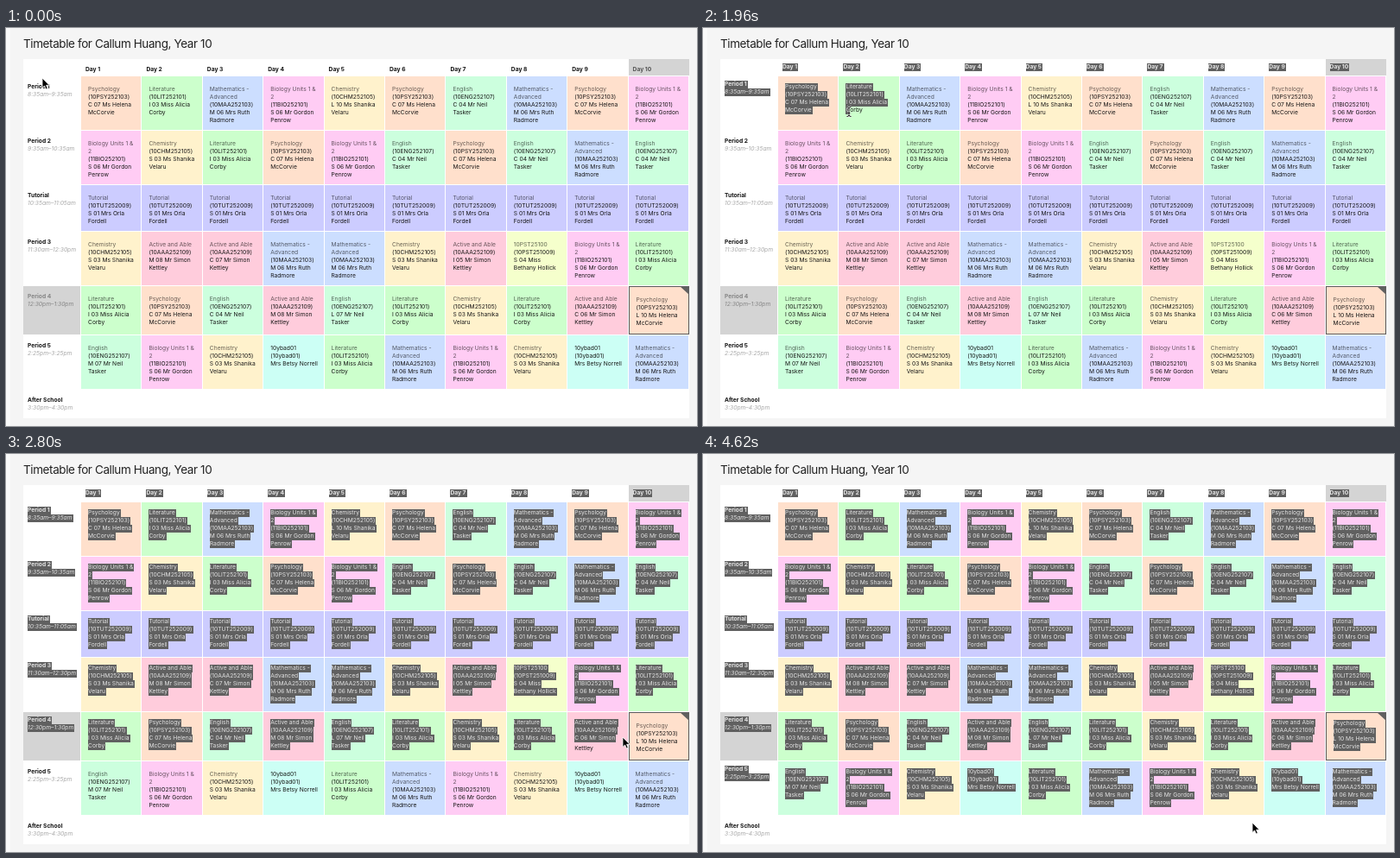
These frames come from a looping animation (800x461 px, 4.69 s). An HTML page:

```html
<!DOCTYPE html>
<html lang="en">
<head>
<meta charset="utf-8">
<title>Timetable</title>
<style>
html, body { margin: 0; width: 100%; height: 100%; overflow: hidden; }
#stage {
  position: relative; width: 800px; height: 461px; overflow: hidden;
  background: #f5f5f5; border-left: 5px solid #fafafa; box-sizing: border-box;
  font: 6.7px/9.1px Inter, "Open Sans", sans-serif; color: #161616; cursor: default;
}
#stage > * { position: absolute; }
#layer { left: -5px; top: 0; width: 800px; height: 461px; }
#layer > * { position: absolute; }
h1 { margin: 0; left: 20px; top: 9px; font-size: 13.5px; line-height: 18px; font-weight: 400; letter-spacing: -.4px; white-space: pre; color: #222; }
.line { height: 9.1px; white-space: pre; }
.line mark { display: inline-block; height: 9.1px; background: #606060; color: #e4e4e4; }
.line mark.full { padding-right: 1px; }
.dim { color: #0009; }
.head { font-weight: 700; color: #111; }
.time { font-style: italic; color: #a8a8a8; }
.off { color: #858585; }
.today { color: #555; }
#edge { box-sizing: border-box; border: 1px solid #5a5a5a; }
svg { left: 0; top: 0; overflow: visible; }
</style>
</head>
<body>
<div id="stage"><div id="layer"></div></div>
<script>
const layer = document.getElementById('layer');
const LOOP = 4690, STEP = 70, LH = 9.1;
const LEFT = 87, COL = 70.4, DRAG = 1820, DROP = 3640;
const tops = [36, 56, 119, 182, 236, 299, 356, 419, 452];

// colour, usual room, lines ("@" is the room)
const subjects = {
  P: ['#ffe0cc', 'C07', 'Psychology|(10PSY252103)|@ Ms Helena|McCorvie'],
  L: ['#ccffcc', 'I03', 'Literature|(10LIT252101)|@ Miss Alicia|Corby'],
  M: ['#ccdeff', 'M06', 'Mathematics -|Advanced|(10MAA252103)|@ Mrs Ruth|Radmore'],
  B: ['#ffccf4', 'S06', 'Biology Units 1 &|2|(11BIO252101)|@ Mr Gordon|Penrow'],
  C: ['#fff2cc', 'S03', 'Chemistry|(10CHM252105)|@ Ms Shanika|Velaru'],
  E: ['#ccffde', 'C04', 'English|(10ENG252107)|@ Mr Neil|Tasker'],
  T: ['#ccccff', 'S01', 'Tutorial|(10TUT252009)|@ Mrs Orla|Fordell'],
  A: ['#ffccdc', 'M08', 'Active and Able|(10AAA252109)|@ Mr Simon|Kettley'],
  G: ['#f5ffcc', 'S04', '10PST25100|(10PST251009)|@ Miss|Bethany Hollick'],
  Y: ['#ccfff5', '', '10ybad01|(10ybad01)|Mrs Betsy Norrell']
};

const rows = [
  ['Period 1', '8:35am–9:35am', 'P L M B C:L10 P E M P B'],
  ['Period 2', '9:35am–10:35am', 'B C L P B E P E M E'],
  ['Tutorial', '10:35am–11:05am', 'T T T T T T T T T T'],
  ['Period 3', '11:30am–12:30pm', 'C A A:C07 M M C A:I05 G B L'],
  ['Period 4', '12:30pm–1:30pm', 'L P E A E:L07 L C L A:C06 P:L10'],
  ['Period 5', '2:25pm–3:25pm', 'E:M07 B C Y L M B C Y M'],
  ['After School', '3:30pm–4:30pm', '']
];

// time, x, y of the pointer
const path = [
  [0, 42, 58], [770, 84, 47], [1260, 84, 47], [1330, 91, 44], [1540, 91, 45],
  [1750, 91, 45], [1960, 169, 97], [2380, 589, 242], [2800, 714, 328],
  [3640, 777, 410], [4270, 777, 410], [4620, 636, 427], [LOOP, 636, 427]
];

const lines = [];
const colX = c => Math.round(LEFT + COL * c);

function add(tag, cls, text = '') {
  const el = document.createElement(tag);
  el.className = cls;
  el.textContent = text;
  layer.append(el);
  return el;
}

function box(x, y, w, h, fill) {
  const el = add('div', '');
  el.style.cssText = `left:${x}px;top:${y}px;width:${w}px;height:${h}px;background:${fill}`;
  return el;
}

function addLine(text, x, mid, cell, cls) {
  const el = add('div', 'line ' + cls);
  const y = mid - LH / 2;
  const mark = document.createElement('mark');
  const rest = document.createTextNode(text);
  el.append(mark, rest);
  el.style.left = x + 'px';
  el.style.top = y + 'px';
  lines.push({ text, x, y, cell, mark, rest, w: el.getBoundingClientRect().width, count: 0 });
}

function addCell(token, r, c) {
  const [key, room] = token.split(':');
  const [fill, usual, text] = subjects[key];
  const place = (room || usual).replace(/^./, '$& ');
  const x = colX(c), y = tops[r];
  const active = r === 5 && c === 9;
  box(x, y, colX(c + 1) - x - 1, tops[r + 1] - y - 1, fill);
  if (active) {
    box(x, y, 70, 56, 'none').id = 'edge';
    box(x + 59, y, 11, 10, '#606060').style.clipPath = 'polygon(0 0, 100% 0, 100% 100%)';
  }
  const parts = text.replace('@', place).split('|');
  const code = key === 'Y' ? 0 : parts.findIndex(s => s[0] === '(');
  parts.forEach((s, i) => addLine(
    s, LEFT + COL * c + 8 + active, y + 12.3 + active + i * LH,
    r * 11 + c + 1, i < code ? 'dim' : ''));
}

function build() {
  add('h1', '', 'Timetable for Callum Huang, Year 10');
  box(20, 36, 771, 416, '#fff');
  box(721, 36, 70, 19, '#d4d4d4');
  box(20, 299, 66, 56, '#d4d4d4');
  for (let c = 0; c < 10; c++)
    addLine('Day ' + (c + 1), LEFT + 5 + COL * c, 45.5, c + 1, c === 9 ? 'head today' : 'head');
  rows.forEach(([name, time, cells], i) => {
    const r = i + 1, y = tops[r] + 9.7;
    const off = i === 4 ? ' off' : '';
    addLine(name, 25, y, r * 11, 'head' + off);
    addLine(time, 25, y + LH, r * 11, 'time' + off);
    if (cells) cells.split(' ').forEach((token, c) => addCell(token, r, c));
  });
  layer.insertAdjacentHTML('beforeend', `<svg width="1" height="1">
    <path id="arrow" d="M0 0V11.4L2.6 9 4.4 13 6.3 12.2 4.6 8.3H8.1Z" fill="#000" stroke="#fff" stroke-width=".8"/>
    <g id="beam" fill="none">
      <path d="M-2.5 -5.5Q0 -5.5 0 -4Q0 -5.5 2.5 -5.5M0 -4V4M-2.5 5.5Q0 5.5 0 4Q0 5.5 2.5 5.5M-1.3 1.5H1.3" stroke="#fff" stroke-width="2"/>
      <path d="M-2.5 -5.5Q0 -5.5 0 -4Q0 -5.5 2.5 -5.5M0 -4V4M-2.5 5.5Q0 5.5 0 4Q0 5.5 2.5 5.5M-1.3 1.5H1.3" stroke="#111"/>
    </g></svg>`);
}

function pointer(t) {
  const i = path.findIndex(p => p[0] > t);
  const a = path[i - 1], b = path[i];
  const k = (t - a[0]) / (b[0] - a[0]);
  return [a[1] + (b[1] - a[1]) * k, a[2] + (b[2] - a[2]) * k];
}

function cellAt(x, y) {
  const r = tops.filter(top => top <= y).length - 1;
  const c = Math.floor((x - LEFT) / COL);
  return r * 11 + Math.max(0, Math.min(9, c)) + 1;
}

function chosen(line, cell, x, y) {
  const n = line.text.length;
  if (line.cell !== cell) return line.cell < cell ? n : 0;
  if (y < line.y) return 0;
  if (y >= line.y + LH) return n;
  return Math.max(0, Math.min(n, Math.round((x - line.x) / line.w * n)));
}

function select(line, count) {
  if (line.count === count) return;
  line.count = count;
  line.mark.textContent = line.text.slice(0, count);
  line.mark.className = count === line.text.length ? 'full' : '';
  line.rest.data = line.text.slice(count);
}

function draw(t) {
  const [x, y] = pointer(t);
  const [sx, sy] = pointer(Math.min(t, DROP));
  const cell = t < DRAG ? -1 : cellAt(sx, sy);
  let overText = false;
  for (const l of lines) {
    select(l, chosen(l, cell, sx, sy));
    overText ||= x >= l.x && x <= l.x + l.w && y >= l.y && y < l.y + LH;
  }
  arrow.style.display = overText ? 'none' : '';
  beam.style.display = overText ? '' : 'none';
  for (const el of [arrow, beam]) el.setAttribute('transform', `translate(${x} ${y})`);
}

build();
const arrow = document.getElementById('arrow');
const beam = document.getElementById('beam');
const start = performance.now();
let last = -1;

function tick() {
  const t = Math.max(0, performance.now() - start) % LOOP;
  const step = Math.floor(t / STEP) * STEP;
  if (step !== last) draw(last = step);
  requestAnimationFrame(tick);
}
tick();
</script>
</body>
</html>
```
